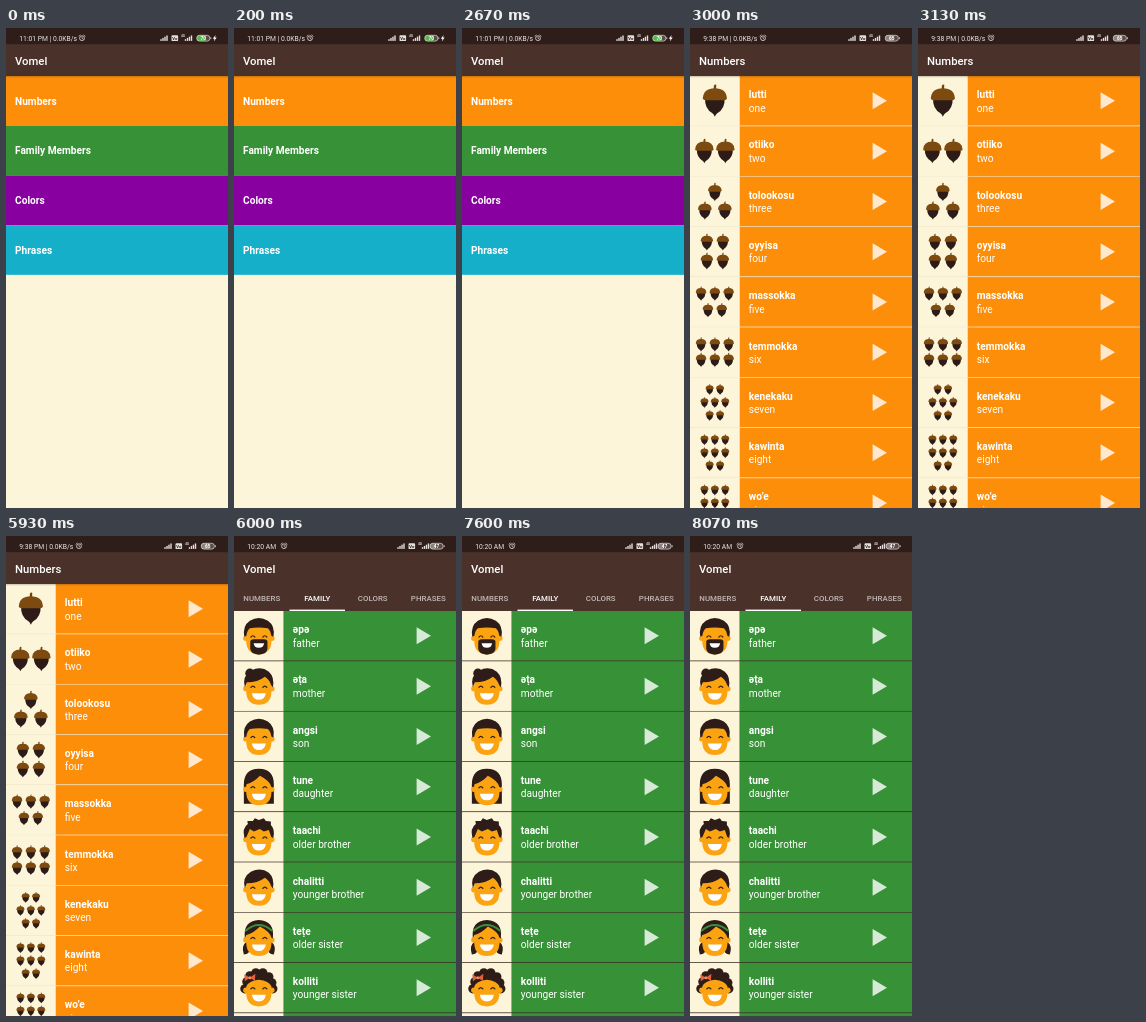
An HTML page that plays this animation: 222x480 px, repeating every 8990 ms.

```html
<!DOCTYPE html>
<html lang="en">
<head>
<meta charset="utf-8">
<title>Word list app</title>
<style>
  html, body { margin: 0; width: 100%; height: 100%; overflow: hidden; background: #2f1d1a; }
  svg { display: block; width: 100vw; height: 100vh; font-family: Roboto, sans-serif; }
</style>
</head>
<body>
<svg id="stage" viewBox="0 0 222 480">
  <defs>
    <linearGradient id="shade" x2="0" y2="1">
      <stop stop-opacity=".22"/><stop offset="1" stop-opacity="0"/>
    </linearGradient>
    <g id="acorn">
      <path d="M-1 1Q0-1 1.4 0L1.2 5H-1.2Z" fill="#70430f"/>
      <path d="M-9.8 13H9.8Q10.4 24 2.4 28.5Q.8 29.6 0 32Q-.8 29.6-2.4 28.5Q-10.4 24-9.8 13Z" fill="#2d1b18"/>
      <path d="M-12 13.4Q-11.5 3.5 0 3.4Q11.5 3.5 12 13.4Q11.6 15.4 9.6 15.4H-9.6Q-11.6 15.4-12 13.4Z" fill="#7d4a10"/>
    </g>
  </defs>
</svg>
<script>
const LOOP = 8990, CUTS = [0, 3000, 6000];
const DP = 222 / 393, ROW = 88 * DP, PITCH = 89 * DP;
const BAR = '#4a312a', TAN = '#fdf5da', DARK = '#2e1c19', SKIN = '#fca311';
const ORANGE = '#fd8e09', GREEN = '#379237';
const APP = 'Vomel';

const rect = (x, y, w, h, fill, more = '') =>
  `<rect x="${x}" y="${y}" width="${w}" height="${h}" fill="${fill}" ${more}/>`;
const path = (d, fill, more = '') => `<path d="${d}" fill="${fill}" ${more}/>`;
const line = (d, color, w) =>
  path(d, 'none', `stroke="${color}" stroke-width="${w}" stroke-linecap="round"`);
const dot = (x, y, r, fill) => `<circle cx="${x}" cy="${y}" r="${r}" fill="${fill}"/>`;
const text = (x, y, s, size, weight = 400, more = '') =>
  `<text x="${x}" y="${y}" font-size="${size}" font-weight="${weight}" fill="#fff" ${more}>${s}</text>`;
const move = (x, y, body) => `<g transform="translate(${x} ${y})">${body}</g>`;

function alarm(x) {
  return move(x, 10.2, '<circle r="2.4" fill="none" stroke="#e4dedc" stroke-width=".8"/>' +
    line('M0-1.2V.2L1 .8M-3.1-2L-1.8-3.1M3.1-2L1.8-3.1', '#e4dedc', .7));
}

function signal(x, w = 8) {
  let s = '';
  for (let i = 0; i < 4; i++) {
    const h = 1.7 + i * 1.25;
    s += rect(x + i * w / 4, 12.9 - h, w / 4 - .6, h, '#e4dedc');
  }
  return s;
}

function battery(x, level, charging) {
  const fill = charging ? '#55b848' : '#8d8280';
  return rect(x, 7.3, 13, 5.8, '#5a4b48', 'rx="2.6"') +
    rect(x, 7.3, 13 * level / 100, 5.8, fill, 'rx="2.6"') +
    rect(x, 7.3, 13, 5.8, 'none', 'rx="2.6" stroke="#e4dedc" stroke-width=".7"') +
    rect(x + 13.6, 9.2, .8, 2, '#e4dedc') +
    text(x + 6.5, 11.9, level, 4.8, 700, 'text-anchor="middle"') +
    (charging ? path(`M${x + 18.8} 7L${x + 16} 10.8H${x + 17.7}L${x + 17} 13.6L${x + 19.9} 9.5H${x + 18.2}Z`, '#fff') : '');
}

function statusBar(clock, bell, x, level, charging) {
  return rect(0, 0, 222, 17, '#2f1d1a') +
    text(13.3, 12.6, clock, 6.75, 400, 'opacity=".9"') + alarm(bell) + signal(x) +
    rect(x + 11.2, 7.2, 6.6, 5.9, '#e4dedc', 'rx=".9"') +
    `<text x="${x + 14.5}" y="11.8" font-size="4.2" font-weight="700" fill="#2f1d1a" text-anchor="middle">Vo</text>` +
    text(x + 20.6, 9.4, '4G', 3.4, 500, 'opacity=".9"') + signal(x + 24.5, 8) +
    battery(x + (charging ? 36.5 : level === 47 ? 32.8 : 37), level, charging);
}

const appBar = (title, h = 32) =>
  rect(0, 16.2, 222, h, BAR) + text(9, 36.7, title, 11.3, 500);
const shadow = () => rect(0, 48, 222, 2, 'url(#shade)');

function wordRow(y, color, word, meaning, picture, divider) {
  const mid = y + ROW / 2;
  return rect(0, y, ROW, ROW, TAN) + rect(ROW, y, 223 - ROW, ROW, color) +
    text(58.8, mid - 2.7, word, 10.17, 700) + text(58.8, mid + 10.7, meaning, 10.17) +
    path(`M182.6 ${mid - 8.5}V${mid + 8.5}L197 ${mid}Z`, '#fff', 'opacity=".8"') +
    move(ROW / 2, mid, picture) +
    rect(0, y + ROW, 222, DP, divider);
}

// Each entry: acorn scale, horizontal gap, vertical gap, acorns per line
const acornSets = [
  [1, 0, 0, [1]], [.76, 21, 0, [2]], [.57, 20, 18.6, [1, 2]], [.52, 16, 19, [2, 2]],
  [.44, 13.8, 16.6, [3, 2]], [.44, 13.8, 15.6, [3, 3]], [.34, 10.4, 13, [2, 3, 2]],
  [.34, 10.4, 13, [3, 3, 2]], [.34, 10.4, 13, [3, 3, 3]]
];

function acorns([size, dx, dy, lines]) {
  let s = '';
  lines.forEach((n, r) => {
    for (let i = 0; i < n; i++) {
      const x = (i - (n - 1) / 2) * dx;
      const y = (r - (lines.length - 1) / 2) * dy - 16 * size;
      s += `<use href="#acorn" transform="translate(${x} ${y}) scale(${size})"/>`;
    }
  });
  return s;
}

const longHair = path('M-15 17V-2Q-15-18 0-18Q15-18 15-2V17Z', DARK);
const shortHair = path('M-14.6 1Q-16.5-10-9-15Q0-20.5 9-15Q16.5-10 14.6 1L12.4 0Q12-5 9-7.5Q0-9-9-7.5Q-12-5-12.4 0Z', DARK);
const swept = path('M-14 1Q-17-10-8-15.5Q2-20.5 10-14.5Q16-9 14 1L12.3-1Q11-6 6-9.5Q-1-4-12-4Z', DARK);
const parted = path('M-14 1Q-16-17 0-17.6Q16-17 14 1L12.4 0Q11-6 1-11Q-5-4.5-12.4-2.5Z', DARK);
const spiky = path('M-14.4 1Q-17-9-11-13L-11.5-16L-6-16L-4-18.6L0-17L5-18.8L7-16L12-15.5L12-12Q16.5-8 14.4 1L12.4 0L10-7L5-5.5L1-8L-5-5.5L-9-8L-12.4 0Z', DARK);
const curls = [[-12, -6], [-9, -12], [-3, -15], [4, -15], [10, -11], [13, -5], [-14, 1], [14, 1]]
  .map(([x, y]) => dot(x, y, 4.6, DARK)).join('');
const bow = path('M-9-10L-14.5-13.5L-14-6.5ZM-9-10L-3.5-14L-4-6.8Z', '#e2623c') + dot(-9, -10, 1.5, '#f48a5c');
const band = line('M-13-7Q0-18 13-7', '#3b8f3c', 2);
const tails = path('M-12 4Q-18 8-15 17Q-9 17-9 10ZM12 4Q18 8 15 17Q9 17 9 10Z', DARK);
const beard = path('M-8.6 6Q-8.6 3.4-5 3.4H5Q8.6 3.4 8.6 6V13Q8 18.6 0 18.8Q-8 18.6-8.6 13Z', DARK);

function face(back, hair, chin = '') {
  const smile = chin ? 'M-5.2 7.4H5.2Q4.8 12 0 12Q-4.8 12-5.2 7.4Z' : 'M-7 7H7Q6 13.6 0 13.6Q-6 13.6-7 7Z';
  return back + dot(-13, 2.5, 2.7, SKIN) + dot(13, 2.5, 2.7, SKIN) +
    path('M-12.6-7Q-12-12 0-12Q12-12 12.6-7V6Q12 18.4 0 18.6Q-12 18.4-12.6 6Z', SKIN) +
    line('M-8 1.2Q-6-1.4-4 1.2M4 1.2Q6-1.4 8 1.2', DARK, 1.2) +
    chin + path(smile, '#fff') + hair;
}

const faces = [
  face('', shortHair, beard),
  face(dot(-9, -13, 4.6, DARK), swept),
  face('', shortHair),
  face(longHair, parted),
  face('', spiky),
  face('', swept),
  face(tails, parted + band),
  face(curls, path('M-13-1Q-15-15 0-15.5Q15-15 13-1Q10-7 0-8Q-10-7-13-1Z', DARK) + bow)
];

function menuScreen() {
  const items = [['Numbers', ORANGE], ['Family Members', GREEN], ['Colors', '#8800a0'], ['Phrases', '#16afca']];
  return rect(0, 0, 222, 480, TAN) +
    statusBar('11:01 PM | 0.0KB/s', 76, 154.3, 70, true) + appBar(APP) +
    items.map(([name, color], i) => {
      const y = 48 + i * ROW;
      return rect(0, y, 222, ROW, color) + text(9, y + 28.5, name, 10.17, 700);
    }).join('') + shadow();
}

function numberScreen() {
  const words = 'lutti one,otiiko two,tolookosu three,oyyisa four,massokka five,temmokka six,kenekaku seven,kawinta eight,wo’e nine';
  return rect(0, 0, 222, 480, TAN) +
    statusBar('9:38 PM | 0.0KB/s', 73, 158.3, 65, false) + appBar('Numbers') +
    words.split(',').map((pair, i) =>
      wordRow(48 + i * PITCH, ORANGE, ...pair.split(' '), acorns(acornSets[i]), '#e9dfc4')).join('') +
    shadow();
}

function familyScreen() {
  const words = 'əpə=father,əṭa=mother,angsi=son,tune=daughter,taachi=older brother,chalitti=younger brother,teṭe=older sister,kolliti=younger sister';
  const tabs = ['NUMBERS', 'FAMILY', 'COLORS', 'PHRASES'].map((name, i) =>
    text(27.75 + i * 55.5, 64.6, name, 7.9, 500,
      `text-anchor="middle" opacity="${i === 1 ? 1 : .65}"`)).join('');
  const end = 75 + 8 * PITCH;
  return rect(0, 0, 222, 480, BAR) +
    statusBar('10:20 AM', 50, 163.3, 47, false) + appBar(APP, 59) + tabs +
    rect(55.5, 73.6, 55.5, 1.4, '#fff') +
    words.split(',').map((pair, i) =>
      wordRow(75 + i * PITCH, GREEN, ...pair.split('='), faces[i], '#302a20')).join('') +
    rect(0, end, ROW, 4, TAN) + rect(ROW, end, 223 - ROW, 4, GREEN);
}

const stage = document.getElementById('stage');
stage.insertAdjacentHTML('beforeend',
  [menuScreen(), numberScreen(), familyScreen()].map(s => `<g class="screen">${s}</g>`).join(''));
const screens = [...stage.querySelectorAll('.screen')];

function show(ms) {
  const t = ms % LOOP;
  const current = CUTS.filter(c => c <= t).length - 1;
  screens.forEach((s, i) => s.setAttribute('display', i === current ? 'inline' : 'none'));
}

const start = performance.now();
function tick() {
  show(performance.now() - start);
  requestAnimationFrame(tick);
}
show(0);
requestAnimationFrame(tick);
</script>
</body>
</html>
```
